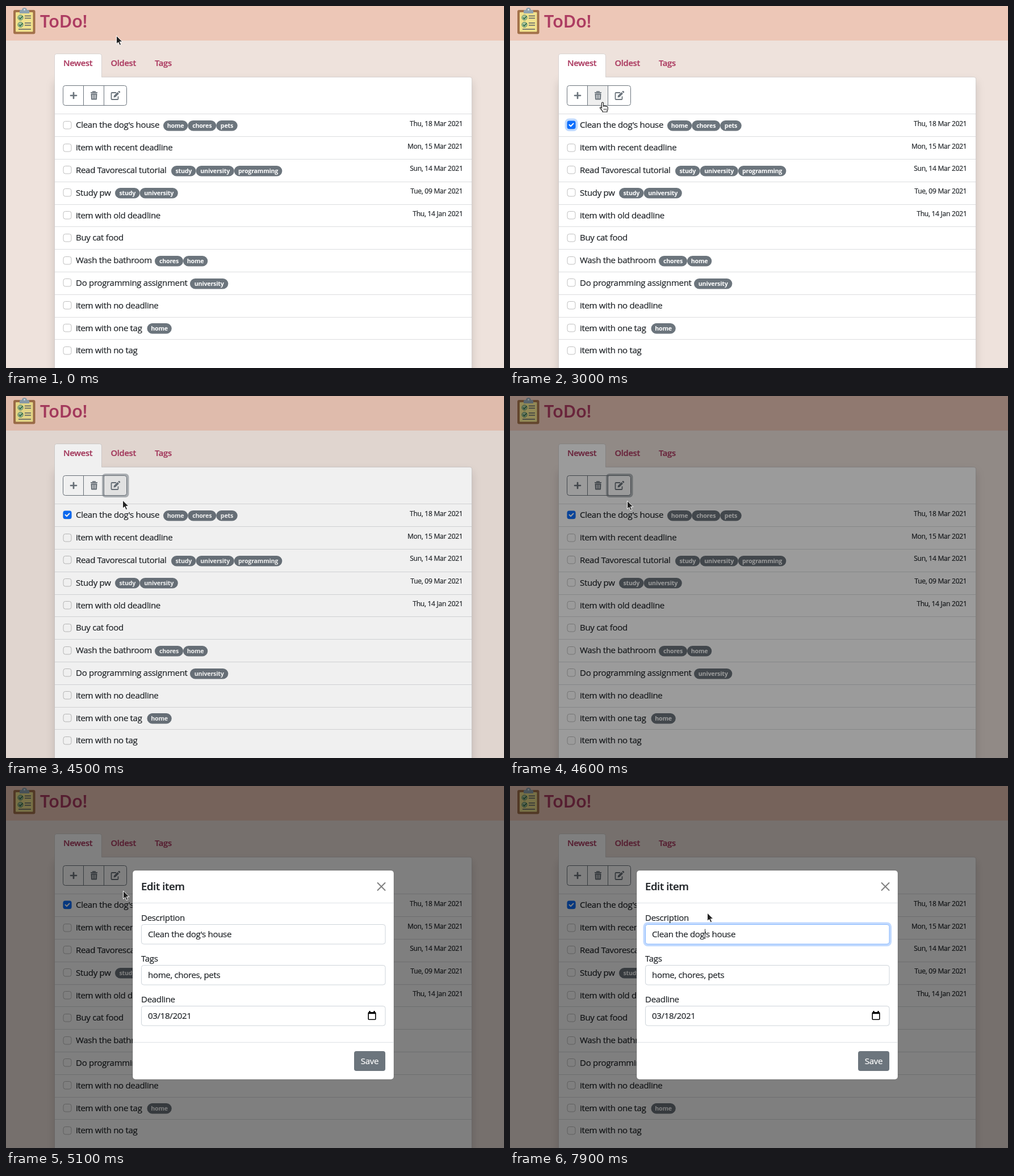
An HTML page for the animation above (8000 ms loop, 877 by 639 pixels).

```html
<!DOCTYPE html>
<html lang="en">
<head>
<meta charset="utf-8">
<title>ToDo list</title>
<style>
html, body { margin: 0; width: 100%; height: 100%; overflow: hidden; background: #eee2dc; }
svg { display: block; width: 877px; height: 639px; }
text {
  font: 15px "Open Sans", "Noto Sans", sans-serif; letter-spacing: -.02em;
  color: #212529; fill: currentColor; stroke: currentColor; stroke-width: .22px;
}
.brand { font-size: 30.5px; font-weight: 600; letter-spacing: 0; color: #ac3b61; }
.tab { font-size: 14.7px; font-weight: 600; color: #ac3b61; }
.date { font-size: 12px; text-anchor: end; }
.badge { font-size: 10.7px; font-weight: 700; color: #fff; stroke: none; text-anchor: middle; }
.heading { font-size: 18.5px; font-weight: 600; }
.save { color: #fff; text-anchor: middle; }
.icon { fill: none; stroke: #6c757d; }
.field { fill: #fff; stroke: #ced4da; }
</style>
</head>
<body>
<svg id="stage" viewBox="0 0 877 639"></svg>
<script>
const stage = document.getElementById('stage');
const $ = id => document.getElementById(id);

const text = (x, y, s, cls = '') => `<text x="${x}" y="${y}" class="${cls}">${s}</text>`;
const box = (x, y, w, h, r, attrs) => `<rect x="${x}" y="${y}" width="${w}" height="${h}" rx="${r}" ${attrs}/>`;
const path = (d, attrs = '') => `<path d="${d}" ${attrs}/>`;

// Description, date, x of the first badge, badges
const items = [
  ["Clean the dog's house", 'Thu, 18 Mar 2021', 277, 'home chores pets'],
  ['item with recent deadline', 'Mon, 15 Mar 2021'],
  ['Read Tavorescal tutorial', 'Sun, 14 Mar 2021', 291, 'study university programming'],
  ['Study pw', 'Tue, 09 Mar 2021', 192, 'study university'],
  ['item with old deadline', 'Thu, 14 Jan 2021'],
  ['Buy cat food'],
  ['Wash the bathroom', '', 262, 'chores home'],
  ['Do programming assignment', '', 324, 'university'],
  ['item with no deadline'],
  ['item with one tag', '', 248.5, 'home'],
  ['item with no tag']
];
const badgeWidth = { home: 43.2, chores: 50, pets: 37.5, study: 43.5, university: 67.3, programming: 84.5 };

function badges(x, y, names) {
  return names.split(' ').map(name => {
    const w = badgeWidth[name];
    const badge = box(x, y, w, 18.5, 9.25, 'fill="#6c757d"') + text(x + w / 2, y + 13, name, 'badge');
    x += w;
    return badge;
  }).join('');
}

function row([label, date = '', x, names], i) {
  const below = offset => Math.round(190.5 + i * 39.8 + offset);
  return path(`M86 ${below(-.2) + .5}H820`, 'stroke="#dcdddf"') +
    box(101, below(12.3) + .5, 14, 13.5, 3.5, 'fill="#fff" stroke="#bfbfbf"') +
    text(123, below(24.8), label) + text(804.5, below(21.3), date, 'date') +
    (names ? badges(x, below(11.5), names) : '');
}

const tick = y => `<circle cx="25.5" cy="${y}" r="4.6" fill="#a8c39a" stroke="#5d8b63"/>` +
  path(`M23 ${y}l2 2.3l4.5-5`, 'fill="none" stroke="#2f6b45" stroke-width="1.6"');
const clipboard = box(13, 7, 38.5, 42.5, 3, 'fill="#a3714a"') + box(17, 11, 30.5, 34.5, 1, 'fill="#f0e18d"') +
  path('M24 13V8.500Q24 7 26 7H28Q28.500 3 32.500 3T37 7H39Q41 7 41 8.500V13Z', 'fill="#8fa3b0"') +
  '<circle cx="32.5" cy="6.5" r="1.5" fill="#dce3e6"/>' + tick(20.5) + tick(33) +
  path('M33 17.500H44M33 21.500H44M33 30H44M33 34H44M22 41H44', 'stroke="#59606a" stroke-width="1.7"');

const icons =
  path('M114 158H124M119 153V163', 'class="icon" stroke-width="2.7" stroke-linecap="round"') +
  path('M149 152.800H161M153 152V151H157V152', 'class="icon" stroke-width="1.7"') +
  path('M150 155H160L159.500 165H150.500Z', 'fill="#6c757d" stroke="#6c757d"') +
  path('M152.500 156.500V163.500M155 156.500V163.500M157.500 156.500V163.500', 'stroke="#fff"') +
  path('M194 153H186.800Q185.500 153 185.500 154.300V163.700Q185.500 165 186.800 165H196.200Q197.500 165 197.500 163.700V159.500',
    'class="icon" stroke-width="1.8"') +
  path('M189.500 161.500L190 158.300L196.300 152L199 154.700L192.700 161ZM197.200 151.200L198.500 150Q199.300 149.500 200 150.200L201 151.200Q201.500 152 201 152.600L199.800 153.800Z',
    'fill="#6c757d"');

const field = (y, label, value, id = '') =>
  text(238, y - 6, label) + box(238.5, y + .5, 429.5, 34.5, 4, `class="field" id="${id}"`) + text(250, y + 23, value);

const modal = box(223, 149, 460, 369, 5, 'fill="#fff" stroke="#000" stroke-opacity=".2"') +
  text(238, 184, 'Edit item', 'heading') +
  path('M654.500 171L667.500 184M667.500 171L654.500 184', 'stroke="#000" stroke-opacity=".5" stroke-width="2" stroke-linecap="round"') +
  path('M223 206.500H683M223 452.500H683', 'stroke="#dee2e6"') +
  box(236.5, 242.5, 433.5, 38.5, 6, 'id="fieldRing" fill="none" stroke="#0d6efd" stroke-opacity=".25" stroke-width="4"') +
  field(244, 'Description', "Clean the dog's house", 'description') +
  path('M343.500 252.500V270', 'id="caret" stroke="#212529"') +
  field(316, 'Tags', 'home, chores, pets') +
  field(388, 'Deadline', '03/18/2021') +
  box(638.2, 399.7, 12.6, 12.6, 1, 'fill="none" stroke="#000" stroke-width="1.6"') +
  path('M638 401H651M640.500 397V400M648.500 397V400', 'stroke="#000" stroke-width="2.4"') +
  box(613, 468, 55, 35, 4, 'fill="#6c757d"') + text(640.5, 491, 'Save', 'save');

const cursors = {
  arrow: path('M0 0V14.500L3.300 11.500L5.700 16.800L8.200 15.700L5.800 10.600H10.500Z', 'fill="#222" stroke="#fff"'),
  hand: path('M-1.500 1Q0-1 1.500 1V7Q3 5.500 4 7Q5.500 6 6.500 7.500Q9 6.800 9.200 9V12Q9 14 8 15V17H0V15.500L-4.500 10Q-4.500 8-2.500 8.500L-1.500 10Z',
    'fill="#fff" stroke="#222" stroke-width="1.2"') + path('M2.500 11V14M4.500 11V14M6.500 11V14', 'stroke="#222" stroke-width=".8"'),
  beam: ['#fff" stroke-width="3', '#222" stroke-width="1.2'].map(s =>
    path('M-3-8Q0-8 0-6.500Q0-8 3-8M0-6.500V6.500M-3 8Q0 8 0 6.500Q0 8 3 8', `fill="none" stroke="${s}"`)).join('')
};

stage.innerHTML =
  box(0, 0, 877, 639, 0, 'fill="#eee2dc"') + box(0, 0, 877, 61, 0, 'fill="#edc7b7"') +
  clipboard + text(60, 38, 'ToDo!', 'brand') +
  box(86, 126, 734, 600, 3, 'fill="#fff" style="filter:drop-shadow(0 8px 8px rgba(0,0,0,.15))"') +
  path('M85.500 640V88.500Q85.500 84.500 89.500 84.500H164.500Q168.500 84.500 168.500 88.500V125.500H816Q820.500 125.500 820.500 129.500V640',
    'fill="#fff" stroke="#000" stroke-opacity=".12"') +
  text(101, 106, 'Newest', 'tab') + text(184.5, 106, 'Oldest', 'tab') + text(262, 106, 'Tags', 'tab') +
  box(137, 141, 36, 34, 0, 'id="trashHover" fill="#efefef"') + box(173, 141, 39.5, 34, 3, 'id="editHover" fill="#efefef"') +
  box(100.5, 140.5, 112, 35, 4, 'class="icon"') + path('M136.500 140.500V175.500M172.500 140.500V175.500', 'class="icon"') +
  box(171, 139, 43.5, 38, 4, 'id="editRing" class="icon" stroke-width="4" stroke-opacity=".5"') + icons +
  items.map(row).join('') +
  '<g id="checked">' + box(100.5, 202.5, 15, 14.5, 3.5, 'fill="#0d6efd"') +
  path('M104.500 209.800L107 212.200L111.500 207.500', 'fill="none" stroke="#fff" stroke-width="2" stroke-linecap="round" stroke-linejoin="round"') + '</g>' +
  box(98.5, 200.5, 19, 18.5, 5.5, 'id="checkRing" fill="none" stroke="#0d6efd" stroke-opacity=".25" stroke-width="4"') +
  box(0, 0, 877, 639, 0, 'id="backdrop"') + `<g id="modal">${modal}</g><g id="cursor"></g>`;

// Pointer stops: time, x, y
const stops = [
  [0, 194.5, 52.5], [400, 194.5, 52.5], [600, 197, 62], [1300, 108, 209], [2700, 108, 209], [3000, 163, 170],
  [3300, 197, 159], [4200, 197, 159], [4500, 205.5, 184], [4600, 206.5, 185], [5500, 206.5, 185],
  [6400, 341, 256], [6600, 344, 246], [6700, 343, 258], [7000, 330, 254], [7100, 330, 254], [7200, 342, 262],
  [7300, 342, 262], [7400, 343, 264], [7600, 343, 264], [7700, 328, 256], [7800, 334, 240], [7900, 347.5, 224], [8000, 347.5, 224]
];
const clamp = v => Math.min(1, Math.max(0, v));
const ramp = (t, start, length) => clamp((t - start) / length);
const during = (t, from, to) => +(t >= from && t < to);

function pointer(t) {
  const i = stops.findIndex(stop => stop[0] > t);
  const [t0, x0, y0] = stops[i - 1], [t1, x1, y1] = stops[i];
  const p = (t - t0) / (t1 - t0), k = p * p * (3 - 2 * p);
  return [x0 + (x1 - x0) * k, y0 + (y1 - y0) * k];
}

function draw(now) {
  // The screen advances ten times a second
  const t = Math.floor(now % 8000 / 100) * 100;
  const show = (id, opacity) => $(id).setAttribute('opacity', opacity);

  show('checked', during(t, 2300, 8000));
  show('checkRing', ramp(t, 2200, 100) * (1 - ramp(t, 3840, 150)));
  show('trashHover', during(t, 3000, 3200));
  show('editHover', during(t, 3200, 4600));
  show('editRing', ramp(t, 3850, 150) * (1 - ramp(t, 4950, 150)));

  show('backdrop', ramp(t, 4482, 150) * .5);
  show('modal', ramp(t, 4635, 150));
  const drop = -50 * (1 - ramp(t, 4630, 300)) ** 1.85;
  $('modal').setAttribute('transform', `translate(0 ${drop})`);

  const focus = ramp(t, 6650, 150);
  show('fieldRing', focus);
  $('description').style.stroke = focus ? '#86b7fe' : '';
  show('caret', during(t, 6700, 7200) || during(t, 7700, 8000));

  const [x, y] = pointer(t);
  const kind = t < 5000 ? (t > 2800 && y > 140 && y < 177 ? 'hand' : 'arrow') : (y > 244 ? 'beam' : 'arrow');
  $('cursor').innerHTML = cursors[kind];
  $('cursor').setAttribute('transform', `translate(${x} ${y})`);
  requestAnimationFrame(() => draw(performance.now() - start));
}
const start = performance.now();
draw(0);
</script>
</body>
</html>
```
